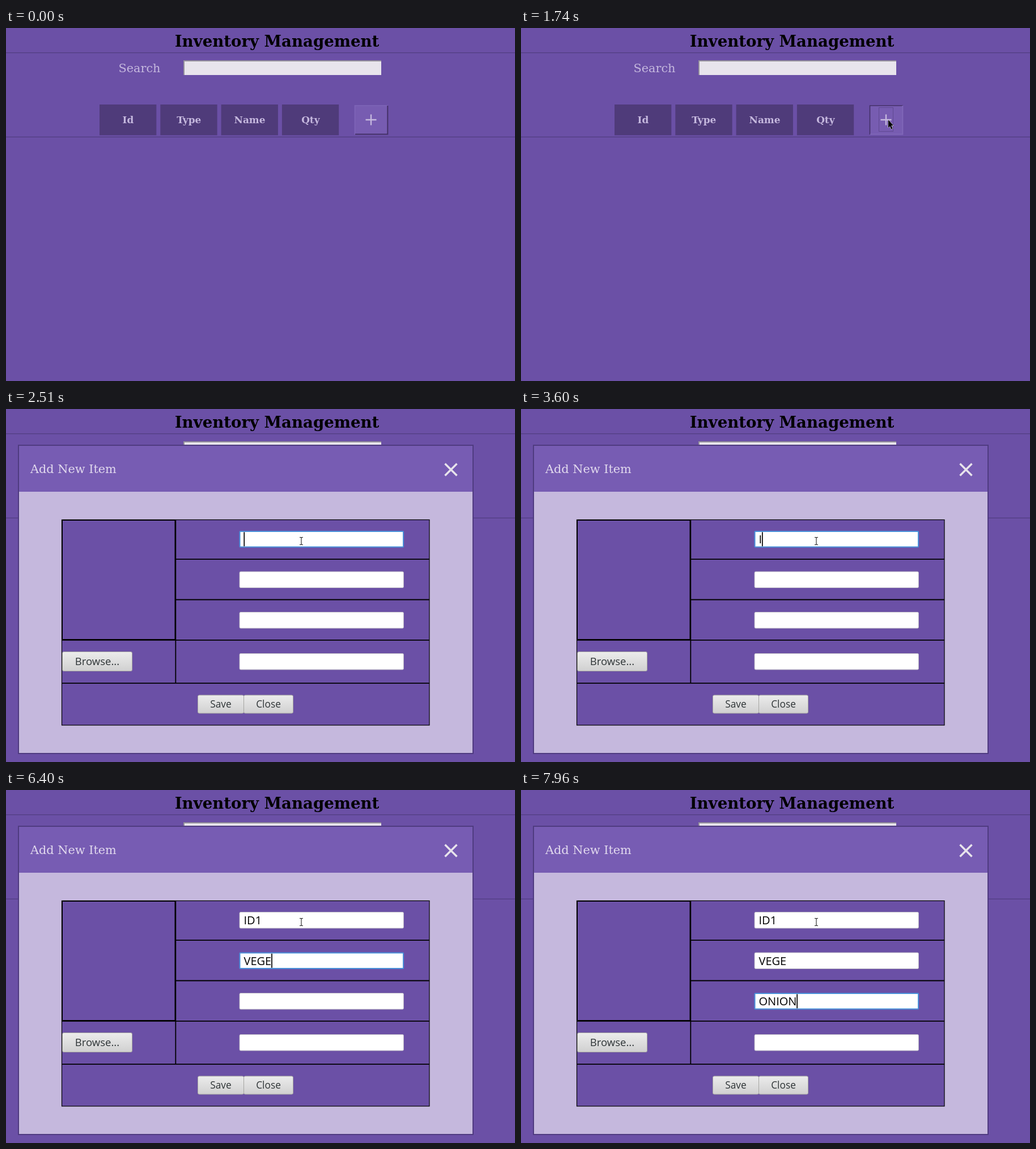
These frames come from a looping animation (898 px wide and 623 px high, 8 s). An HTML page:

```html
<!DOCTYPE html>
<html lang="en">
<head>
<meta charset="utf-8">
<title>Inventory Management</title>
<style>
  html, body { margin: 0; width: 100%; height: 100%; overflow: hidden; background: #6b50a6; }
  svg { display: block; width: 898px; height: 623px; }
  text { font-family: "DejaVu Serif", serif; white-space: pre; }
  .title { font-weight: bold; font-size: 27.6px; text-anchor: middle; }
  .label { font-size: 20.8px; fill: #c5b8de; }
  .heading { font-weight: bold; font-size: 16.9px; fill: #c5b8de; text-anchor: middle; }
  .button { font-family: "Open Sans", "Noto Sans", sans-serif; fill: #2e3436; text-anchor: middle; }
  .value { font-family: "Open Sans", "Noto Sans", sans-serif; font-size: 20px; }
  .rule { stroke: #513d80; stroke-width: 1.2; }
  .grid { fill: none; stroke: #000; }
</style>
</head>
<body>
<svg viewBox="0 0 898 623">
  <defs>
    <linearGradient id="grey" x2="0" y2="1">
      <stop stop-color="#ececec"/><stop offset="1" stop-color="#d0d0d0"/>
    </linearGradient>
  </defs>

  <text class="title" x="478" y="33">Inventory Management</text>
  <path class="rule" d="M0 43.6H898M0 192.4H898"/>
  <text class="label" x="198.5" y="77.5">Search</text>
  <rect x="313" y="57" width="349" height="26" fill="#e8e4ec"/>
  <path d="M314 83V58H662" fill="none" stroke="#96929c" stroke-width="2"/>
  <g id="headings"></g>

  <g id="add">
    <rect x="615" y="136.5" width="59" height="52" fill="#775cb1"/>
    <path id="topLeft" d="M615.5 188V137H674" fill="none" stroke-width="1.6"/>
    <path id="bottomRight" d="M616 187.5H673.3V137" fill="none" stroke-width="2"/>
    <path d="M634.5 162H653.5M644 152.5V171.5" stroke="#c5b8de" stroke-width="2.4"/>
    <rect id="ring" x="631.5" y="140.5" width="25" height="42" fill="none" stroke="#493673" stroke-dasharray="1 1"/>
  </g>

  <g id="modal">
    <rect x="22" y="64" width="802" height="544" fill="#c5b8dd" stroke="#4f3b80" stroke-width="2"/>
    <rect x="23" y="65" width="800" height="81" fill="#775cb3"/>
    <text class="label" x="43" y="113" style="fill:#e2daee">Add New Item</text>
    <path d="M774.5 96.5L795.5 117.5M795.5 96.5L774.5 117.5" stroke="#e8e4ec" stroke-width="3.4"/>
    <rect x="98.5" y="195.5" width="648.5" height="362.5" fill="#6b50a6" stroke="#000" stroke-width="1.2"/>
    <path class="grid" stroke-width="1.8" d="M299.3 195V484M299 265.2H747M299 336.5H747M98 407.8H747M98 483.8H747"/>
    <rect class="grid" stroke-width="2" x="99" y="196" width="199.5" height="211"/>
    <g id="buttons"></g>
    <g id="fields"></g>
    <rect id="caret" width="1.7" height="25"/>
  </g>

  <path id="arrow" d="M0 0V14L3 11.2L5.2 16.4L7.4 15.4L5.2 10.3H9Z" stroke="#fff" stroke-width="1" paint-order="stroke"/>
  <g id="beam" fill="none">
    <path d="M-3 -6.5H-1L0 -5.5L1 -6.5H3M0 -5.5V5.5M-3 6.5H-1L0 5.5L1 6.5H3" stroke="#fff" stroke-width="3"/>
    <path d="M-3 -6.5H-1L0 -5.5L1 -6.5H3M0 -5.5V5.5M-3 6.5H-1L0 5.5L1 6.5H3" stroke="#222" stroke-width="1.1"/>
  </g>
</svg>
<script>
const LOOP = 8000, PRESS = 1670, OPEN = 1820, FOCUS = 2510;
const $ = id => document.getElementById(id);

function add(parent, name, attrs, text = '') {
  const node = document.createElementNS('http://www.w3.org/2000/svg', name);
  for (const key in attrs) node.setAttribute(key, attrs[key]);
  node.textContent = text;
  return parent.appendChild(node);
}
function show(node, visible) {
  node.style.display = visible ? '' : 'none';
}

['Id', 'Type', 'Name', 'Qty'].forEach((name, i) => {
  const x = 165 + i * 107.3;
  add($('headings'), 'rect', { x, y: 135, width: 100.3, height: 54.3, fill: '#4f3b7a' });
  add($('headings'), 'text', { x: x + 50.4, y: 168, class: 'heading' }, name);
});

function button(name, x, y, width, height, size) {
  add($('buttons'), 'rect', { x: x + .5, y: y + .5, width: width - 1, height: height - 1, rx: 2.5, fill: 'url(#grey)', stroke: '#a6a6a2' });
  add($('buttons'), 'text', { x: x + width / 2, y: y + height / 2 + 6.4, class: 'button', 'font-size': size }, name);
}
button('Browse...', 99, 428, 124, 35, 18.5);
button('Save', 338, 504.5, 82, 33, 17.3);
button('Close', 419, 504.5, 88, 33, 17.3);

const fields = [215, 286.5, 358, 431].map(y => ({
  y,
  box: add($('fields'), 'rect', { fill: '#fff' }),
  text: add($('fields'), 'text', { x: 419.5, y: y + 22, class: 'value' })
}));

// focus time, word, and the time of each keystroke, one row per field
const typing = [
  [FOCUS, 'ID1', [3600, 3750, 4290]],
  [4520, 'VEGE', [5700, 6000, 6230, 6400]],
  [6630, 'ONION', [7180, 7410, 7560, 7730, 7880]]
];

// time, x, y; the pointer jumps from step to step
const pointer = [
  [130, 773, 515], [207, 752, 450], [283, 722, 365], [360, 688, 280],
  [437, 657, 215], [513, 634, 172], [590, 624, 156],
  [820, 627, 155], [897, 632, 153], [973, 637, 152], [1050, 639, 151],
  [1360, 643, 157], [1440, 646, 163], [PRESS, 648, 162],
  [2050, 622, 180], [2130, 575, 208], [2200, 530, 230], [2280, 517, 236],
  [FOCUS, 521, 233]
];
const BEAM_FROM = 2200;

function drawFields(t) {
  const active = typing.findLastIndex(row => t >= row[0]);
  fields.forEach(({ y, box, text }, i) => {
    const [, word, keys] = typing[i] || [0, '', []];
    const focused = i === active, inset = focused ? 1 : .5;
    text.textContent = word.slice(0, keys.filter(k => t >= k).length);
    const look = {
      x: 411.5 + inset, y: y + inset, width: 290.5 - 2 * inset, height: 29.5 - 2 * inset,
      rx: focused ? 1 : 2, stroke: focused ? '#4a90d9' : '#b5afc0', 'stroke-width': 2 * inset
    };
    for (const key in look) box.setAttribute(key, look[key]);
    if (focused) {
      const width = text.textContent ? text.getComputedTextLength() : 0;
      $('caret').setAttribute('x', 419.4 + width);
      $('caret').setAttribute('y', y + 2.3);
    }
  });
  show($('caret'), active >= 0);
}

function drawPointer(t) {
  const step = pointer.findLast(p => t >= p[0]);
  const beam = t >= BEAM_FROM;
  show($('arrow'), step && !beam);
  show($('beam'), step && beam);
  if (step) $(beam ? 'beam' : 'arrow').setAttribute('transform', `translate(${step[1]} ${step[2]})`);
}

function draw(t) {
  const pressed = t >= PRESS;
  $('topLeft').setAttribute('stroke', pressed ? '#443168' : '#7f66b8');
  $('bottomRight').setAttribute('stroke', pressed ? '#7f66b8' : '#443168');
  show($('ring'), pressed);
  show($('modal'), t >= OPEN);
  drawFields(t);
  drawPointer(t);
}

const start = performance.now();
function tick() {
  draw((performance.now() - start) % LOOP);
  requestAnimationFrame(tick);
}
tick();
</script>
</body>
</html>
```
